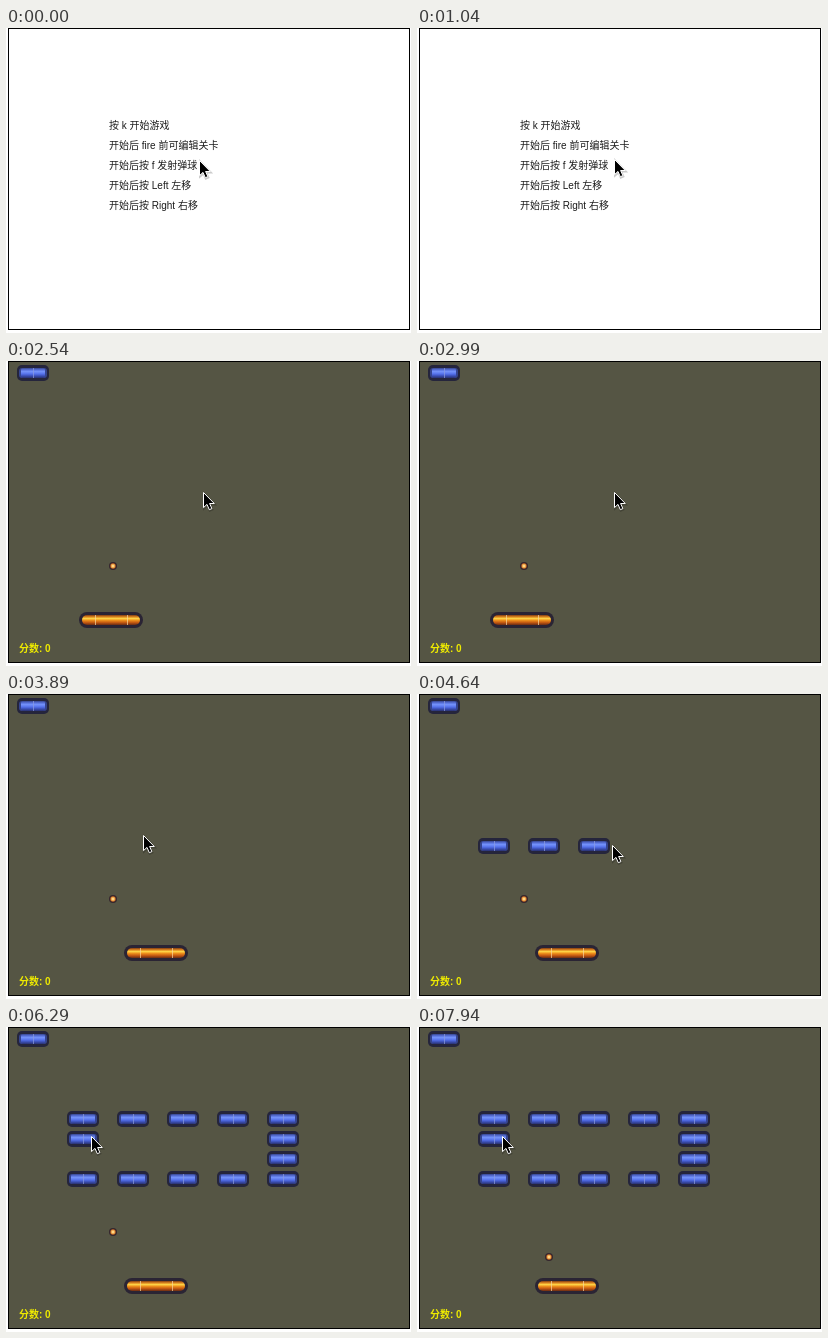
These frames come from a looping animation (405x305 px, 8000 ms). An HTML page:

```html
<!DOCTYPE html>
<html lang="zh-CN">
<head>
<meta charset="utf-8">
<title>弹球游戏</title>
<style>
  html, body { margin: 0; width: 100%; height: 100%; overflow: hidden; background: #fff; }
  svg { display: block; width: 405px; height: 305px; }
  text { font: 10px "Liberation Sans", "Noto Sans CJK SC", "Noto Sans CJK", sans-serif; white-space: pre; }
  #menu { fill: #1c1c1c; }
  .score { font-weight: bold; fill: #eeea00; }
</style>
</head>
<body>
<svg viewBox="0 0 405 305">
  <defs>
    <linearGradient id="blue" x2="0" y2="1">
      <stop offset="0" stop-color="#37468f"/>
      <stop offset=".2" stop-color="#5a74de"/>
      <stop offset=".36" stop-color="#7492fa"/>
      <stop offset=".6" stop-color="#5470ea"/>
      <stop offset=".78" stop-color="#3c50b8"/>
      <stop offset="1" stop-color="#2a3270"/>
    </linearGradient>
    <linearGradient id="orange" x2="0" y2="1">
      <stop offset="0" stop-color="#843c12"/>
      <stop offset=".2" stop-color="#e08a20"/>
      <stop offset=".36" stop-color="#ffd648"/>
      <stop offset=".52" stop-color="#f0921c"/>
      <stop offset=".75" stop-color="#c45a12"/>
      <stop offset="1" stop-color="#6c2c14"/>
    </linearGradient>
    <radialGradient id="glow">
      <stop offset="0" stop-color="#fff2c0"/>
      <stop offset=".4" stop-color="#ffc868"/>
      <stop offset="1" stop-color="#c8641c"/>
    </radialGradient>
    <g id="brick">
      <rect width="32" height="16" rx="5" fill="#25253c"/>
      <rect x="2" y="3" width="28" height="10" rx="3" fill="#36458f"/>
      <rect x="4" y="3" width="24" height="10" rx="2" fill="url(#blue)"/>
      <path d="M16.5 3v10" stroke="#8c9ce0" opacity=".7"/>
    </g>
    <path id="arrow" d="M.5 .5V15.6L4 12.4 6.3 17.7 8.9 16.6 6.6 11.5H11.3Z"/>
  </defs>

  <rect x="2.5" y=".5" width="401" height="301" fill="#fff" stroke="#000"/>
  <g id="menu"></g>
  <g id="game">
    <rect x="3" y="1" width="400" height="300" fill="#555544"/>
    <g id="bricks"></g>
    <g id="paddle">
      <rect width="64" height="16" rx="8" fill="#2a2434"/>
      <rect x="3" y="3" width="58" height="10" rx="5" fill="url(#orange)"/>
      <path d="M16.5 3v10M48.5 3v10" stroke="#f8d8a0" opacity=".7"/>
    </g>
    <g id="ball">
      <circle r="4" fill="#35262e"/>
      <circle r="2.7" fill="url(#glow)"/>
    </g>
    <text class="score" x="13" y="291">分数: 0</text>
  </g>
  <g id="cursor">
    <use href="#arrow" x=".5" y="1" stroke="#000" stroke-width="2" opacity=".2"/>
    <use href="#arrow" stroke="#fff"/>
  </g>
</svg>
<script>
const LOOP = 8000, TICK = 150, TICK_OFFSET = 140;
const GAME_START = 1790, DRAG_START = 4100, DRAG_LAG = 75, LAUNCH = 7940;
const COLS = 8, CELL_W = 50, CELL_H = 20, PADDLE_STEP = 15;

const byId = id => document.getElementById(id);
const svgNode = (tag, attrs, parent) => {
  const node = document.createElementNS("http://www.w3.org/2000/svg", tag);
  for (const key in attrs) node.setAttribute(key, attrs[key]);
  return parent.appendChild(node);
};
const move = (id, x, y) => byId(id).setAttribute("transform", `translate(${x} ${y})`);
const show = (node, on) => node.setAttribute("visibility", on ? "inherit" : "hidden");

// Linear motion through [time, ...values] key points.
function along(keys, t) {
  const next = keys.findIndex(key => key[0] > t);
  if (next <= 0) return keys.at(next).slice(1);
  const from = keys[next - 1], to = keys[next];
  const part = (t - from[0]) / (to[0] - from[0]);
  return from.slice(1).map((value, i) => value + (to[i + 1] - value) * part);
}

const dragPath = [
  [3590, 197, 131], [4190, 76, 150], [4940, 275, 152], [5090, 275, 152],
  [5390, 274, 90], [5540, 237, 83], [6140, 82, 98], [6290, 85, 109]
];
const paddlePath = [[2390, 103], [2690, 43], [2840, 43], [3140, 118]];

function cursorAt(t) {
  if (t < 150) return [193, 132];
  if (t < 1040) return [195, 132];
  return along(dragPath, t);
}

function paddleAt(t) {
  const [x] = along(paddlePath, t);
  return 13 + Math.floor((x - 13) / PADDLE_STEP) * PADDLE_STEP;
}

// Dragging leaves a brick in every cell the cursor crosses.
const bricks = new Map();
function addBrick(col, row, time) {
  const cell = row * COLS + col;
  if (bricks.has(cell)) return;
  const pos = { href: "#brick", x: 11 + col * CELL_W, y: 4 + row * CELL_H };
  bricks.set(cell, { time, node: svgNode("use", pos, byId("bricks")) });
}
addBrick(0, 0, 0);
for (let t = DRAG_START; t <= dragPath.at(-1)[0]; t += 5) {
  const [x, y] = along(dragPath, t);
  addBrick(Math.floor((x - 3) / CELL_W), Math.floor((y - 1) / CELL_H), t + DRAG_LAG);
}

const hints = ["按 k 开始游戏", "开始后 fire 前可编辑关卡", "开始后按 f 发射弹球",
  "开始后按 Left 左移", "开始后按 Right 右移"];
hints.forEach((hint, i) => {
  svgNode("text", { x: 103, y: 101 + 20 * i }, byId("menu")).textContent = hint;
});

function render(now) {
  // The picture only changes on ticks.
  const ticks = Math.floor((now - TICK_OFFSET) / TICK);
  const t = now < GAME_START ? now : TICK_OFFSET + ticks * TICK;
  const playing = t >= GAME_START;
  show(byId("menu"), !playing);
  show(byId("game"), playing);
  bricks.forEach(({ time, node }) => show(node, t >= time));
  move("paddle", paddleAt(t), 251);
  const flight = t >= LAUNCH ? 25 : 0;
  move("ball", 107 + flight, 205 + flight);
  move("cursor", ...cursorAt(t).map(Math.round));
}

const start = performance.now();
function frame() {
  render((performance.now() - start) % LOOP);
  requestAnimationFrame(frame);
}
frame();
</script>
</body>
</html>
```
